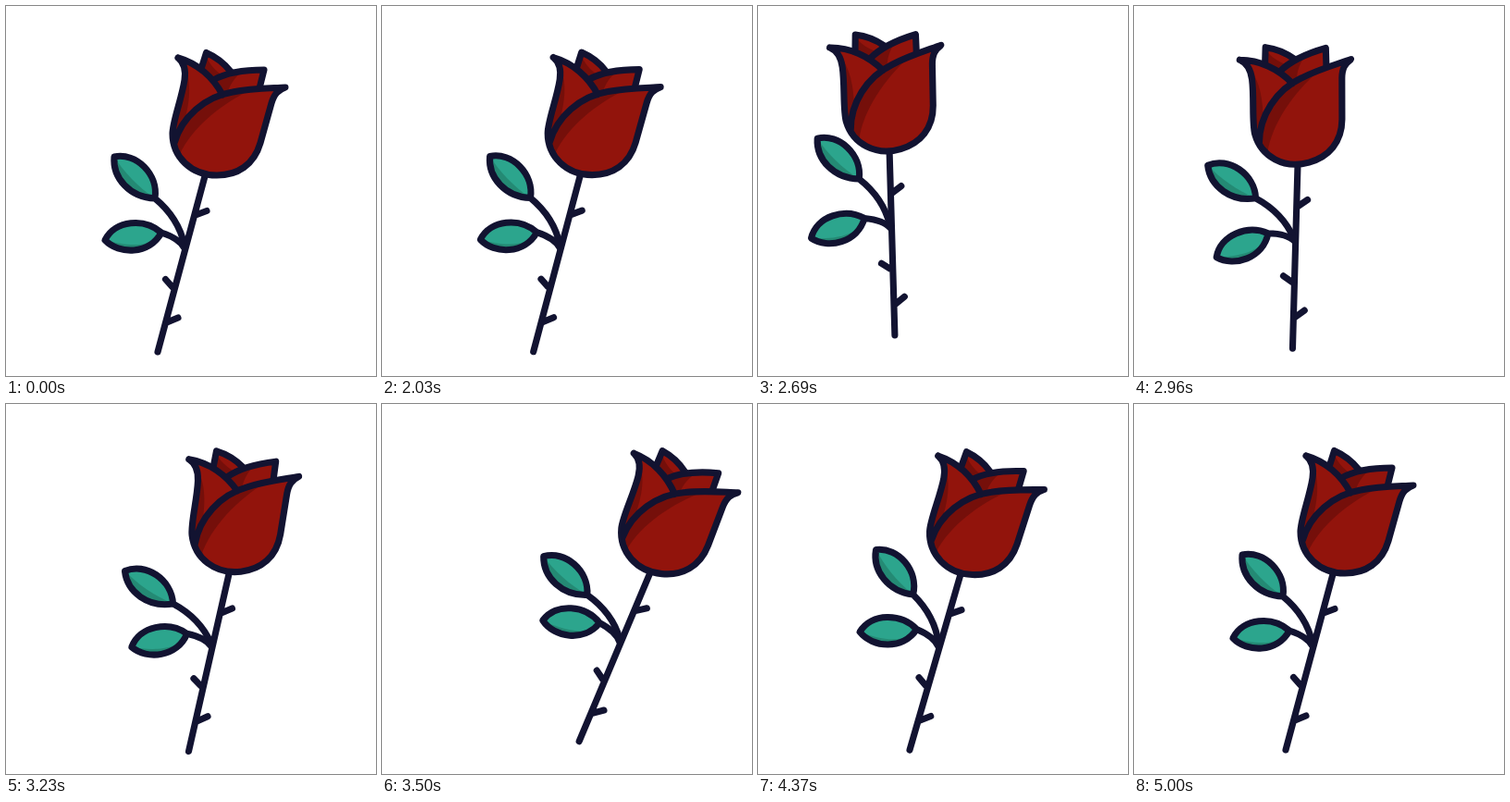
Animation of 400 by 400 pixels, one loop 5.03 s. Source, as an HTML page:

```html
<!DOCTYPE html>
<html lang="en">
<head>
<meta charset="utf-8">
<title>Swaying rose</title>
<style>
  html, body { margin: 0; width: 100%; height: 100%; overflow: hidden; background: #fff; }
  svg { display: block; width: 100vw; height: 100vh; }
  .line { fill: none; stroke: #121331; stroke-width: 7.1; stroke-linecap: round; stroke-linejoin: round; }
  .red { fill: #92140c; }
  .shade { fill: #750f0a; }
  .green { fill: #2ca58d; }
  .deep { fill: #248a74; }
</style>
</head>
<body>
<svg viewBox="0 0 400 400">
  <g id="rose">
    <path class="line" d="M164 374L215 184M205 226L217 221.5M180 304L172.500 295.500M174 342L186 337"/>
    <g id="upperLeaf">
      <path class="deep" d="M117 163C115 186 134 207 161 208C165 182 141 158 117 163Z"/>
      <path class="green" d="M117 163C128 180 142 195 161 208C165 182 141 158 117 163Z"/>
      <path class="line" d="M117 163C115 186 134 207 161 208C165 182 141 158 117 163ZM161 208C178 222 189 240 193 259"/>
    </g>
    <g id="lowerLeaf">
      <path class="deep" d="M107 253C118 231 150 229 168 245C155 269 122 269 107 253Z"/>
      <path class="green" d="M107 253C118 231 150 229 168 245C157 263 128 259 107 253Z"/>
      <path class="line" d="M107 253C118 231 150 229 168 245C155 269 122 269 107 253ZM168 245C180 249 189 254 193 262"/>
    </g>
    <g id="head">
      <!-- back petals -->
      <path class="red" d="M211 68L216.500 50.500C227 55 236 62 243 71L224 80Z"/>
      <path class="shade" d="M211 68L216 53C219 62 226 70 234 75L224 80Z"/>
      <path class="red" d="M224 80C240 71 260 69 279 69L274 89L234 96Z"/>
      <path class="shade" d="M224 80C234 74 243 72 255 71C248 77 242 84 239 95L234 96Z"/>
      <path class="line" d="M211 68L216.500 50.500C227 55 236 62 243 71M224 80C240 71 260 69 279 69L274 89"/>
      <!-- left petal -->
      <path class="red" d="M186 56C207 62 224 77 234 96L182 148C176 128 190 103 193 80C195 67 191 60 186 56Z"/>
      <path class="shade" d="M193 66C201 82 199 104 192 128L182 148C176 128 190 103 193 80Z"/>
      <!-- front petal -->
      <path class="red" d="M302 88C285 89 265 89 245 93C215 98 190 120 182 148C186 170 205 183 228 183C250 183 268 172 275 148L287 105C290 95 294 91 302 88Z"/>
      <path class="shade" d="M266 90C215 95 190 120 182 148L188 160C201 132 232 106 266 90Z"/>
      <path class="line" d="M186 56C207 62 224 77 234 96M182 148C190 120 215 98 245 93C265 89 285 89 302 88C294 91 290 95 287 105L275 148C268 172 250 183 228 183C200 183 180 163 180 138C180 125 190 100 193 80C195 67 191 60 186 56"/>
    </g>
  </g>
</svg>
<script>
const LOOP = 5030, STEP = 30, PHASE = 20;

// Each motion eases in and out between a few [time, value] poses.
const poses = {
  x: [[2000, 164], [2420, 138.5], [3600, 214.5], [4186, 164]],
  y: [[2000, 374], [2420, 351.5], [2500, 351.5], [3180, 376], [3560, 364], [3980, 374]],
  tilt: [[2000, 15], [2480, -1.7], [2755, -1.7], [3646, 24.5], [4580, 15]],
  upperLeaf: [[2000, 0], [2400, 21.5], [3420, -12], [3560, -12], [3980, 15], [4560, 0]],
  lowerLeaf: [[2000, 0], [2360, 14], [2960, -4], [3200, -4], [3980, 15], [4560, 0]]
};

function sample(name, t) {
  const keys = poses[name], next = keys.findIndex(([time]) => time > t);
  if (next === 0) return keys[0][1];
  if (next < 0) return keys[keys.length - 1][1];
  const [t0, v0] = keys[next - 1], [t1, v1] = keys[next];
  return v0 + (v1 - v0) * (1 - Math.cos(Math.PI * (t - t0) / (t1 - t0))) / 2;
}

const setTransform = (id, value) => document.getElementById(id).setAttribute("transform", value);

function draw(now) {
  const t = Math.floor((now % LOOP - PHASE) / STEP) * STEP + PHASE;
  const at = name => sample(name, t);
  const tilt = at("tilt");
  const drag = 1.15 * (sample("tilt", t - 80) - tilt); // the flower trails the stem
  setTransform("rose", `translate(${at("x")} ${at("y")}) rotate(${tilt - 15}) translate(-164 -374)`);
  setTransform("head", `rotate(${drag} 215 184)`);
  for (const leaf of ["upperLeaf", "lowerLeaf"]) setTransform(leaf, `rotate(${at(leaf)} 194 259)`);
}

const start = performance.now();
function tick() {
  draw(performance.now() - start);
  requestAnimationFrame(tick);
}
tick();
</script>
</body>
</html>
```
